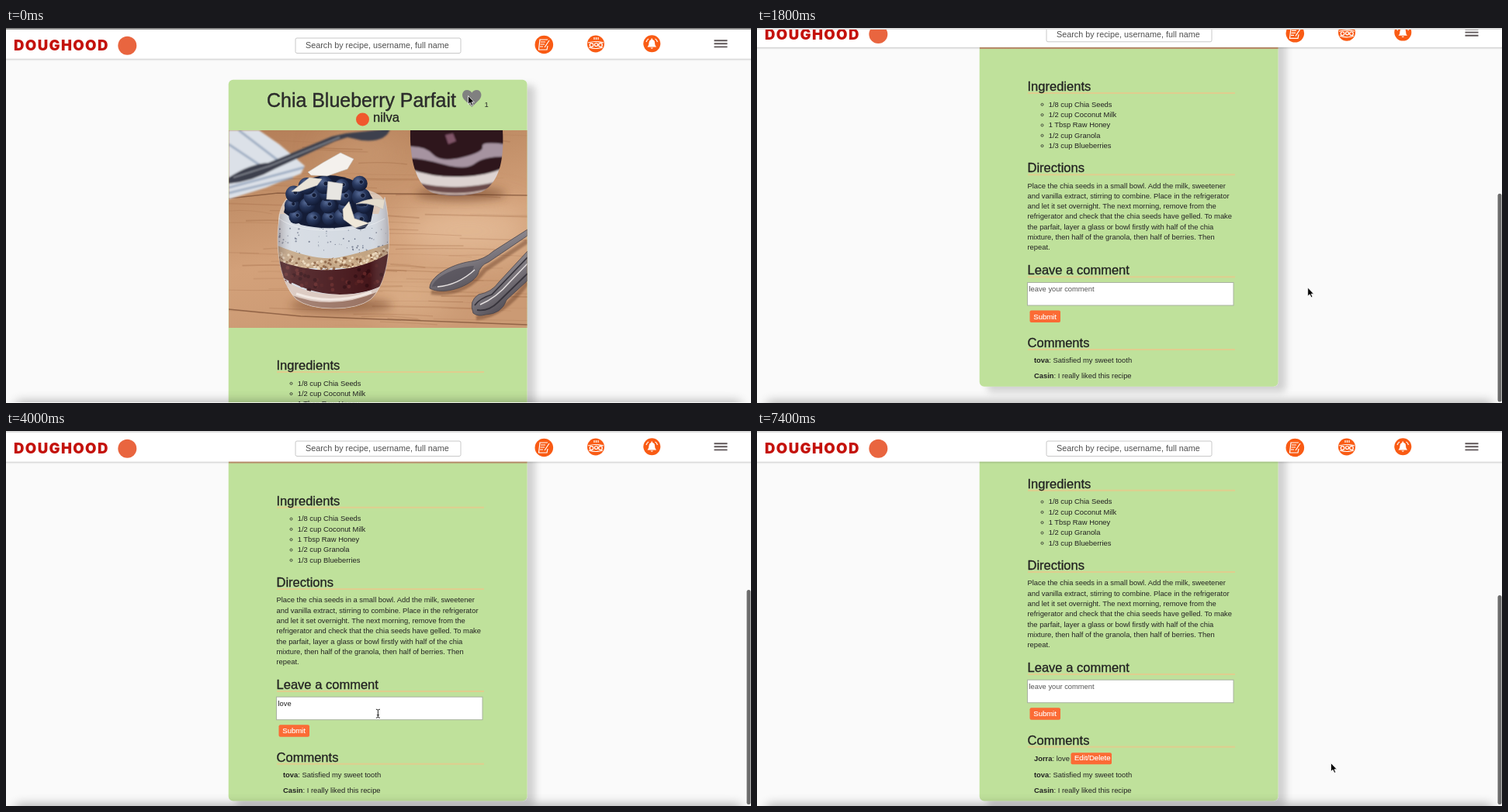
An HTML page for the animation above (7.5 s loop, 960 px wide and 484 px high).

```html
<!DOCTYPE html>
<html lang="en">
<head>
<meta charset="utf-8">
<title>Recipe page</title>
<style>
  html, body { margin: 0; width: 100%; height: 100%; overflow: hidden; background: #fafafa; }
  #stage { display: block; width: 960px; height: 484px; }
  text { font: 9.4px "Liberation Sans", Arial, sans-serif; fill: #222; white-space: pre; }
  .title { font-size: 24.95px; stroke: #2b2b2b; stroke-width: .4; fill: #2b2b2b; }
  .head { font-size: 16.55px; stroke: #222; stroke-width: .3; }
  .brand { font: 900 18.6px Inter, sans-serif; letter-spacing: 1.4px; fill: #c4120c; }
  .search { font-size: 10.8px; fill: #505050; }
  .hint { font-size: 9.33px; fill: #555; }
  .btn { font-size: 9.5px; fill: #fff; stroke: #fff; stroke-width: .15; }
  .bold { font-weight: bold; }
</style>
</head>
<body>
<svg id="stage" viewBox="0 0 960 484">
  <defs>
    <filter id="cardShadow" x="-10%" y="-5%" width="125%" height="112%">
      <feDropShadow dx="10" dy="7" stdDeviation="5" flood-opacity=".17"/>
    </filter>
    <filter id="barShadow" x="-2%" y="-20%" width="104%" height="150%">
      <feDropShadow dx="0" dy="1" stdDeviation="1" flood-opacity=".25"/>
    </filter>
    <filter id="soft" x="-30%" y="-60%" width="160%" height="220%"><feGaussianBlur stdDeviation="6"/></filter>
    <filter id="dockBlur" x="-5%" y="-200%" width="110%" height="500%"><feGaussianBlur stdDeviation="7"/></filter>
    <filter id="glow" x="-50%" y="-50%" width="200%" height="200%"><feGaussianBlur stdDeviation="22"/></filter>
    <filter id="blur2" x="-10%" y="-10%" width="120%" height="120%"><feGaussianBlur stdDeviation="1.3"/></filter>
    <linearGradient id="wood" x2=".35" y2="1">
      <stop offset="0" stop-color="#b37d57"/><stop offset=".3" stop-color="#c08d66"/>
      <stop offset=".65" stop-color="#d3a17a"/><stop offset="1" stop-color="#cb9a74"/>
    </linearGradient>
    <linearGradient id="glassShade">
      <stop offset="0" stop-color="#321818" stop-opacity=".45"/><stop offset=".15" stop-color="#fff" stop-opacity=".12"/>
      <stop offset=".8" stop-color="#fff" stop-opacity="0"/><stop offset="1" stop-color="#321818" stop-opacity=".4"/>
    </linearGradient>
    <linearGradient id="steel" x2=".6" y2="1">
      <stop offset="0" stop-color="#d6d0d0"/><stop offset=".45" stop-color="#8b868c"/><stop offset="1" stop-color="#4a464e"/>
    </linearGradient>
    <radialGradient id="berry" cx=".38" cy=".3" r=".75">
      <stop offset="0" stop-color="#566a95"/><stop offset=".45" stop-color="#27375d"/><stop offset="1" stop-color="#0f1730"/>
    </radialGradient>
    <clipPath id="cup"><path d="M353 240C346 278 351 326 374 350Q390 362 422 362T470 350C494 328 499 270 488 218L480 240Z"/></clipPath>
    <clipPath id="backCup"><path d="M521 132C520 174 530 204 550 213Q580 221 612 212C636 200 642 170 640 132Z"/></clipPath>
  </defs>

  <g id="page">
    <rect id="card" x="286.700" y="66.700" width="384.800" height="756" rx="6" fill="#bfe19b" filter="url(#cardShadow)"/>
    <text class="title" x="336" y="102">Chia Blueberry Parfait</text>
    <path id="heart" d="M600.300 102L590.500 92.500C586 87.500 588 80 594 80Q598 80 600.300 83.500Q602.500 80 606.500 80C612.500 80 614.500 87.500 610 92.500Z"/>
    <text id="likes" x="616.500" y="102" font-size="9"></text>
    <circle cx="459.500" cy="118" r="8.500" fill="#f0582d"/>
    <text class="head" x="473" y="121">nilva</text>

    <svg x="287" y="132" width="384.500" height="255" viewBox="287 132 384.500 255" preserveAspectRatio="none">
      <rect x="287" y="132" width="385" height="255" fill="url(#wood)"/>
      <g filter="url(#glow)" opacity=".75">
        <ellipse cx="595" cy="262" rx="85" ry="32" fill="#e9c3a0"/>
        <ellipse cx="520" cy="345" rx="55" ry="24" fill="#e3b993"/>
        <ellipse cx="460" cy="160" rx="50" ry="20" fill="#cf9f78"/>
      </g>
      <g id="grain" stroke="#8f5836"></g>
      <path d="M287 220L350 213L520 214L672 216M287 363L380 372L672 383" fill="none" stroke="#6d422b" stroke-width="1.500" opacity=".6"/>
      <g filter="url(#blur2)">
        <path d="M287 132H326L352 150L385 178L380 188L335 206L287 221Z" fill="#dce1e8"/>
        <path d="M287 206L384 180M287 213L370 193M300 132L352 172M287 150L336 183" stroke="#8497b3" stroke-width="3" fill="none" opacity=".65"/>
        <path d="M287 193Q315 175 338 174L420 140L438 136L495 130Q490 148 458 145L440 141L424 146L346 182Q318 198 287 201Z" fill="#3d414d"/>
        <path d="M293 193L340 178L430 141" stroke="#a9adb6" fill="none"/>
      </g>
      <ellipse cx="586" cy="214" rx="58" ry="9" fill="#63361f" opacity=".5" filter="url(#soft)"/>
      <g clip-path="url(#backCup)" filter="url(#blur2)">
        <rect x="515" y="130" width="130" height="92" fill="#2f121b"/>
        <path d="M520 153Q540 152 550 163T588 167T614 153T642 150L642 166Q615 166 604 175T564 176T521 168Z" fill="#a693a0"/>
        <path d="M520 182Q550 193 585 192T642 180V200Q590 214 520 204Z" fill="#ddd3d1"/>
        <path d="M528 199Q580 212 634 198L610 222H550Z" fill="#6a4848"/>
        <path d="M540 210Q582 219 622 209" fill="none" stroke="#d9c4bb" stroke-width="2"/>
        <path d="M566 138L576 136L580 146L570 150Z" fill="#805467"/>
      </g>
      <ellipse cx="432" cy="358" rx="66" ry="9" fill="#6b3b20" opacity=".5" filter="url(#soft)"/>
      <path d="M351 246Q356 200 420 203T488 225V256Q420 275 351 256Z" fill="#e3d9cf" opacity=".75"/>
      <g clip-path="url(#cup)">
        <rect x="345" y="205" width="155" height="160" fill="#d3d9e1"/>
        <g id="seeds" fill="#4f5870"></g>
        <path d="M345 279Q400 302 430 296T498 277V310H345Z" fill="#c2a482"/>
        <g id="granola"></g>
        <path d="M345 298Q385 315 425 312T498 288V325Q470 344 430 344T350 318Z" fill="#45161a"/>
        <g id="jam"></g>
        <path d="M350 319Q380 344 430 344T498 320V365H350Z" fill="#d9c6bd"/>
        <path d="M366 344Q420 366 480 340L470 364H380Z" fill="#9a7464"/>
        <path d="M374 343Q420 359 471 341" fill="none" stroke="#f1e7e1" stroke-width="3"/>
        <rect x="345" y="205" width="155" height="160" fill="url(#glassShade)"/>
      </g>
      <path d="M353 240C346 278 351 326 374 350Q390 362 422 362T470 350C494 328 499 270 488 218" fill="none" stroke="#f1e5dc" opacity=".5"/>
      <g id="berries"></g>
      <g stroke="#c5c0b9" stroke-width=".6">
        <path d="M389 186L408 174L431 161L448 169L440 182L414 191L393 190Z" fill="#f4f1ed"/>
        <path d="M415 198L434 201L431 222L413 221Z" fill="#e8e6e2"/>
        <path d="M368 211L391 193L407 195L401 203L378 211Z" fill="#e9e3d8"/>
        <path d="M434 234L442 224L449 246L468 252L450 258L435 247Z" fill="#efe8d9"/>
        <path d="M451 227Q472 217 488 222L486 234Q467 224 451 227Z" fill="#e5dccb"/>
      </g>
      <path d="M352 246Q374 262 420 261T488 246" fill="none" stroke="#fff" opacity=".4"/>
      <path d="M548 341Q590 347 617 312L672 275M606 374Q640 372 672 328" fill="none" stroke="#5b321d" stroke-width="6" opacity=".4" filter="url(#blur2)"/>
      <g fill="url(#steel)" stroke="#48434a" stroke-width=".8">
        <path d="M546 336C545 322 572 305 600 301Q616 299 628 288L672 260V268L622 302Q611 306 608 318C600 333 564 346 546 336Z"/>
        <path d="M602 368Q596 352 609 344Q626 341 635 328L672 288V326L645 351Q639 369 618 370Q608 373 602 368Z"/>
      </g>
      <path d="M549 334C552 321 580 308 603 307Q600 328 549 334Z" fill="#55515a" opacity=".75"/>
      <path d="M556 334Q582 332 604 312M611 357Q632 348 648 329L672 304" fill="none" stroke="#e4dfdf" stroke-width="1.500"/>
      <path d="M607 364Q622 366 634 354L672 317M604 358Q610 349 626 344L672 296" fill="none" stroke="#37343c" stroke-width="1.800"/>
    </svg>

    <g id="details"></g>
    <rect x="348.500" y="688.500" width="265.500" height="29.500" fill="#fff" stroke="#a9b2a2"/>
    <text id="entry" x="350.500" y="700"></text>
    <rect id="submit" x="351.500" y="724.500" width="39.500" height="15.500" rx="2"/>
    <text class="btn" x="356.300" y="735.700">Submit</text>
    <g id="newComment">
      <text x="357" y="793"><tspan class="bold">Jorra</tspan>: love</text>
      <rect x="404.500" y="782.500" width="52.500" height="15" rx="2" fill="#fb6b35"/>
      <text class="btn" x="409" y="792.800">Edit/Delete</text>
    </g>
    <g id="oldComments">
      <text x="357" y="792"><tspan class="bold">tova</tspan>: Satisfied my sweet tooth</text>
      <text x="357" y="812.200"><tspan class="bold">Casin</tspan>: I really liked this recipe</text>
    </g>
  </g>

  <g id="header">
    <rect x="-5" y="-30" width="970" height="69.500" fill="#fff" filter="url(#barShadow)"/>
    <text class="brand" x="10" y="29.300">DOUGHOOD</text>
    <circle cx="156.300" cy="22.800" r="12" fill="#e9653f"/>
    <rect x="373" y="13" width="213" height="19.500" rx="2" fill="#fff" stroke="#c8c8c8"/>
    <text class="search" x="386" y="26.300">Search by recipe, username, full name</text>
    <g fill="#f95b14"><circle cx="693.300" cy="21.500" r="11.800"/><circle cx="760" cy="20.500" r="11"/><circle cx="832.300" cy="20.300" r="11"/></g>
    <g fill="none" stroke="#fff" stroke-width="1.200">
      <path d="M698 15H688L686.500 28H697L698 23M689 18H695M688.500 21H694M688 24H692M700 16L694 25"/>
      <path d="M750 19Q760 16 770 19M751 25Q760 28 769 25M758 12V15M760.500 12V15M763 12V15"/>
      <circle cx="754.500" cy="22" r="2.300"/><circle cx="760.500" cy="21.500" r="2"/><circle cx="766" cy="22" r="2.300"/>
      <path d="M825 18Q826 15 828 14M839.500 18Q838.500 15 836.500 14"/>
    </g>
    <path d="M826.500 24.500Q828.500 23 828.500 19Q829 15.500 831.500 15V13.500H833V15Q836 15.500 836 19Q836 23 838 24.500ZM830.500 25.500H834Q832.300 28 830.500 25.500Z" fill="#fff"/>
    <path d="M912.500 16.200H929.500M912.500 20.300H929.500M912.500 24.400H929.500" stroke="#5d5557" stroke-width="1.900"/>
  </g>

  <rect id="thumb" x="954.500" width="5" rx="2.500" fill="#6c6c6c"/>
  <rect x="12" y="482" width="936" height="16" rx="6" opacity=".3" filter="url(#dockBlur)"/>
  <rect id="topEdge" width="960" height="2"/>
  <rect id="bottomEdge" y="483" width="960" height="1" fill="#fff" opacity=".8"/>

  <g id="arrow"><path d="M0 0V11L2.600 8.800L4.400 12.800L6.200 12L4.500 8.200H7.800Z" fill="#000" stroke="#fff" stroke-width=".8"/></g>
  <g id="beam"><path d="M-2.500 -5.500Q0 -5.500 0 -4Q0 -5.500 2.500 -5.500M0 -4V4M-2.500 5.500Q0 5.500 0 4Q0 5.500 2.500 5.500M-1.500 2H1.500" fill="none" stroke="#222"/></g>
  <g id="hand"><path d="M-2.500 -5Q-1.500 -6.500 -.500 -5V-1L4 0Q5 1 4.300 3L3 6H-2L-5 1Q-4.500 -.500 -2.500 1Z" fill="#fff" stroke="#111" stroke-width="1"/></g>
</svg>

<script>
const $ = id => document.getElementById(id);
const LOOP = 7500, MAX_SCROLL = 345.3, ROW = 22;

let seed = 7;
const rand = (lo, hi) => {
  seed = (seed * 16807) % 2147483647;
  return lo + (hi - lo) * seed / 2147483647;
};
const repeat = (n, make) => Array.from({ length: n }, (_, i) => make(i)).join('');

$('grain').innerHTML = repeat(90, () => {
  const x = rand(260, 600), y = rand(134, 385), w = rand(40, 150);
  return `<path d="M${x} ${y}q${w / 2} ${rand(-3, 3)} ${w} ${rand(0, 4)}" fill="none" stroke-width="${rand(.4, 2)}" opacity="${rand(.08, .28)}"/>`;
});
$('seeds').innerHTML = repeat(75, () =>
  `<circle cx="${rand(352, 492)}" cy="${rand(258, 292)}" r="${rand(.5, 1.2)}" opacity="${rand(.4, .9)}"/>`);

// Scatters spots along the sagging line of a layer in the glass.
const layerSpots = (n, top, bottom, r, colors) => repeat(n, i => {
  const x = rand(352, 494), dip = 14 * (1 - ((x - 415) / 75) ** 2);
  return `<circle cx="${x}" cy="${rand(top, bottom) + dip}" r="${r}" fill="${colors[i % colors.length]}"/>`;
});
$('granola').innerHTML = layerSpots(190, 284, 300, 1.7, ['#ead6b9', '#8c6243', '#d0b08c']);
$('jam').innerHTML = layerSpots(60, 302, 326, 2.4, ['#5f2324', '#330d12', '#4e1a1c']);

// Rows of berries, narrowing towards the top of the pile.
const pile = [[5, 246, 376, 20], [5, 231, 367, 23], [5, 216, 372, 22], [4, 202, 385, 24]];
$('berries').innerHTML =
  '<path d="M358 238Q366 198 408 190Q458 188 475 225L470 250Q420 264 380 254Z" fill="#141c36"/>' +
  pile.map(([n, y, x0, gap]) => repeat(n, i => {
    const x = x0 + i * gap + rand(-3, 3), cy = y + rand(-3, 3), r = rand(9, 12);
    return `<circle cx="${x}" cy="${cy}" r="${r}" fill="url(#berry)"/>
      <circle cx="${x + 2}" cy="${cy - 2}" r="${r * .27}" fill="#131b35" stroke="#596b91" stroke-width=".8"/>`;
  })).join('');

const heading = (label, y) =>
  `<rect x="349" y="${y + 2}" width="267" height="2" fill="#e7cb8c" opacity=".85"/><text class="head" x="348.500" y="${y}">${label}</text>`;
const ingredients = ['1/8 cup Chia Seeds', '1/2 cup Coconut Milk', '1 Tbsp Raw Honey', '1/2 cup Granola', '1/3 cup Blueberries'];
const directions = [
  'Place the chia seeds in a small bowl. Add the milk, sweetener',
  'and vanilla extract, stirring to combine. Place in the refrigerator',
  'and let it set overnight. The next morning, remove from the',
  'refrigerator and check that the chia seeds have gelled. To make',
  'the parfait, layer a glass or bowl firstly with half of the chia',
  'mixture, then half of the granola, then half of berries. Then',
  'repeat.'
];
$('details').innerHTML =
  heading('Ingredients', 441) + heading('Directions', 546.3) +
  heading('Leave a comment', 678.3) + heading('Comments', 772) +
  ingredients.map((item, i) => {
    const y = 461.6 + i * 13.33;
    return `<circle cx="367.500" cy="${y - 2.8}" r="1.500" fill="none" stroke="#222" stroke-width=".8"/><text x="375.700" y="${y}">${item}</text>`;
  }).join('') +
  directions.map((line, i) => `<text x="348.500" y="${566.5 + i * 13.33}">${line}</text>`).join('');

const smooth = k => k * k * (3 - 2 * k);
function track(keys, t, ease = k => k) {
  const i = keys.findIndex(key => key[0] > t);
  if (i < 0) return keys.at(-1).slice(1);
  if (i === 0) return keys[0].slice(1);
  const a = keys[i - 1], b = keys[i], k = ease((t - a[0]) / (b[0] - a[0]));
  return a.slice(1).map((v, j) => v + (b[j + 1] - v) * k);
}

const scrollKeys = [[1400, 0], [1500, 70], [1600, 235], [1700, 352], [1800, 360], [1900, 357],
  [2100, 348], [2300, MAX_SCROLL], [6200, MAX_SCROLL], [6400, 356.6], [6700, MAX_SCROLL + ROW]];
const pointerKeys = [[600, 595.5, 87.5], [1200, 709.7, 335], [2200, 709.7, 335], [2800, 491.7, 362],
  [3900, 491.7, 362], [4400, 373, 388], [5200, 373, 388], [5900, 739.5, 428.5]];

const show = (id, on) => $(id).setAttribute('visibility', on ? 'visible' : 'hidden');
const set = (id, attrs) => Object.entries(attrs).forEach(([k, v]) => $(id).setAttribute(k, v));
const move = (id, x, y) => set(id, { transform: `translate(${x} ${y})` });

function draw(t) {
  const [scroll] = track(scrollKeys, t);
  const posted = t >= 4700, liked = t >= 400;
  const limit = MAX_SCROLL + (posted ? ROW : 0);
  move('page', 0, -scroll);
  move('header', 0, -Math.max(0, scroll - limit));

  set('heart', { fill: liked ? '#ff5e14' : '#808080' });
  $('likes').textContent = liked ? 2 : 1;

  set('card', { height: 756 + (posted ? ROW : 0) });
  show('newComment', posted);
  move('oldComments', 0, posted ? ROW : 0);

  const typed = posted ? '' : 'love'.slice(0, Math.max(0, Math.floor((t - 3300) / 100)));
  $('entry').textContent = typed || 'leave your comment';
  set('entry', { class: typed ? '' : 'hint' });

  const [x, y] = track(pointerKeys, t, smooth);
  const pageY = y + scroll;
  const onSubmit = x > 351 && x < 391 && pageY > 724 && pageY < 741;
  const onEntry = x > 349 && x < 614 && pageY > 688 && pageY < 718;
  set('submit', { fill: onSubmit ? '#777' : '#fb6b35' });
  const shape = onSubmit ? 'hand' : onEntry ? 'beam' : 'arrow';
  for (const id of ['arrow', 'beam', 'hand']) {
    show(id, id === shape);
    move(id, x, y);
  }

  const resized = t > 6200;
  const top = scroll * (resized ? .577 : .594);
  set('thumb', { y: top, height: Math.min(482.5, top + (resized ? 270 : 277)) - top });
  show('thumb', t >= 1500);

  set('topEdge', { fill: t < 100 ? '#888' : '#dcdcdc' });
  show('bottomEdge', t < 100);
}

const start = performance.now();
function tick() {
  const t = (performance.now() - start) % LOOP;
  draw(Math.floor(t / 100) * 100);
  requestAnimationFrame(tick);
}
tick();
</script>
</body>
</html>
```
